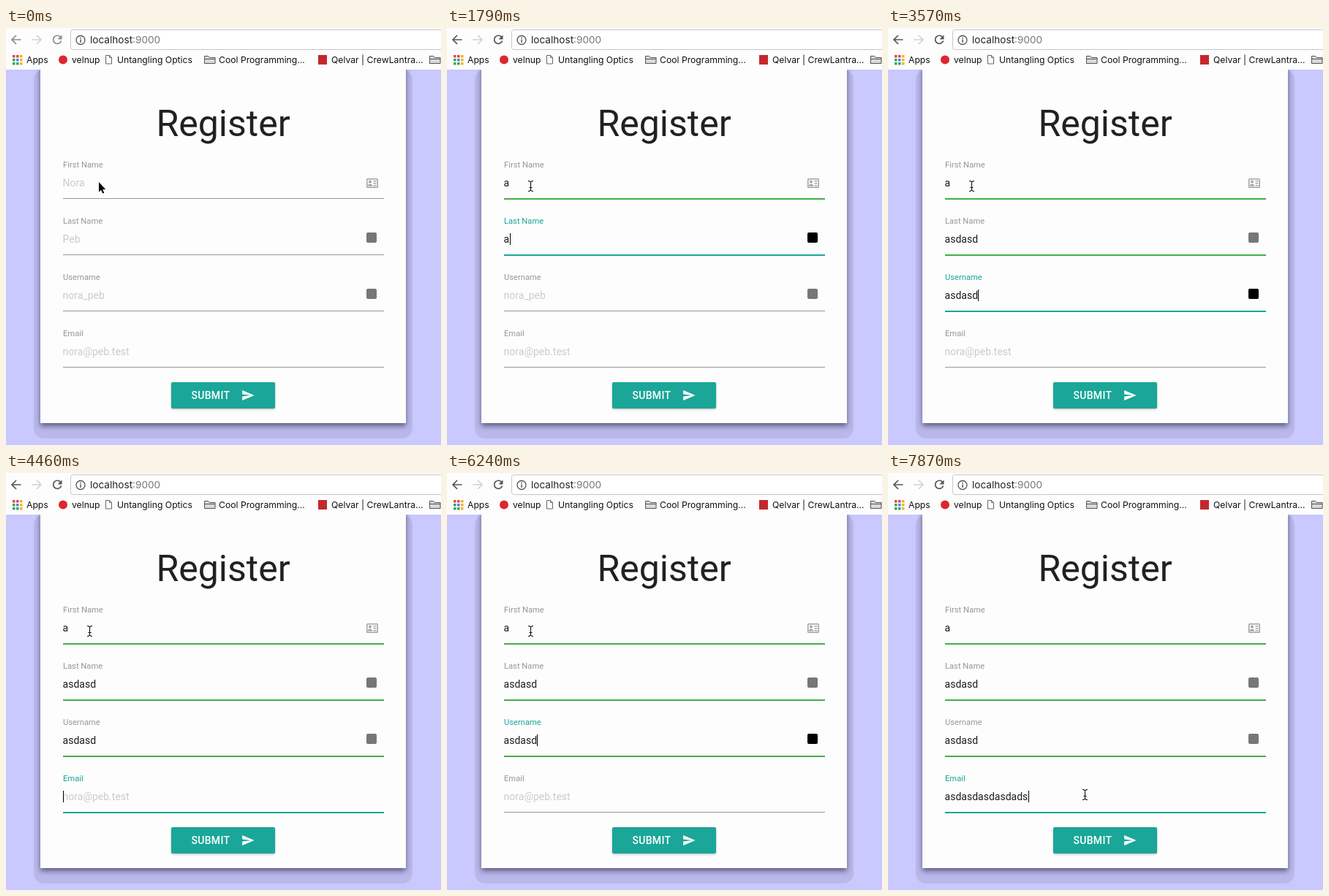
An HTML page with a canvas for the animation above (8 s loop, 595 by 571 pixels).

```html
<!DOCTYPE html>
<html lang="en">
<head>
<meta charset="utf-8">
<title>Register form</title>
<style>
  html, body { margin: 0; width: 100%; height: 100%; overflow: hidden; background: #c9c8ff; }
  canvas { display: block; width: 595px; height: 571px; }
</style>
</head>
<body>
<canvas id="stage" width="595" height="571"></canvas>
<script>
const ctx = document.getElementById('stage').getContext('2d');
const LOOP = 8000;
const STEP = 148.3;
const TEAL = '#1aa698';
const GREEN = '#43ad48';
const GREY = '#979797';
const UI = 'Inter, sans-serif';
const BODY = 'Roboto, sans-serif';

// Key lists hold [step, value]; a value lasts until the next key.
const focusKeys = [[0, -1], [8, 0], [11, 1], [20, 2], [28, 3], [34, 2], [44, 3]];
const fields = [
  { label: 'First Name', hint: 'Nora', text: 'a', icon: 'card', validFrom: 11,
    typed: [[0, 0], [9, 1]] },
  { label: 'Last Name', hint: 'Peb', text: 'asdasd', icon: 'square', validFrom: 20,
    typed: [[0, 0], [12, 1], [13, 2], [14, 3], [15, 5], [16, 6]] },
  { label: 'Username', hint: 'nora_peb', text: 'asdasd', icon: 'square', validFrom: 28,
    selected: [34, 37],
    typed: [[0, 0], [21, 1], [22, 3], [23, 4], [24, 6], [37, 0], [40, 2], [41, 4], [42, 6]] },
  { label: 'Email', hint: 'nora@peb.test', text: 'asdasdasdasdads', validFrom: Infinity,
    typed: [[0, 0], [46, 1], [47, 2], [48, 5], [49, 7], [50, 10], [51, 12], [52, 14], [53, 15]] }
];
const mouseKeys = [[0, 127, 211], [4, 114, 216], [50, 114, 216],
  [51, 190, 320], [52, 245, 410], [53, 269, 440]];

function valueAt(keys, step) {
  return keys.filter(key => key[0] <= step).pop()[1];
}

function mouseAt(step) {
  const next = mouseKeys.findIndex(key => key[0] > step);
  if (next < 0) return mouseKeys[mouseKeys.length - 1].slice(1);
  const [s0, x0, y0] = mouseKeys[next - 1];
  const [s1, x1, y1] = mouseKeys[next];
  const k = (step - s0) / (s1 - s0);
  return [Math.round(x0 + (x1 - x0) * k), Math.round(y0 + (y1 - y0) * k)];
}

function rect(x, y, w, h, color, radius = 0) {
  ctx.fillStyle = color;
  ctx.beginPath();
  ctx.roundRect(x, y, w, h, radius);
  ctx.fill();
}

function circle(x, y, r, color) {
  ctx.fillStyle = color;
  ctx.beginPath();
  ctx.arc(x, y, r, 0, Math.PI * 2);
  ctx.fill();
}

function text(str, x, y, size, color, family = BODY, weight = 400) {
  ctx.font = `${weight} ${size}px ${family}`;
  ctx.fillStyle = color;
  ctx.fillText(str, x, y);
  return ctx.measureText(str).width;
}

function stroke(path, color, width = 1) {
  ctx.strokeStyle = color;
  ctx.lineWidth = width;
  ctx.stroke(new Path2D(path));
}

function fill(path, color) {
  ctx.fillStyle = color;
  ctx.fill(new Path2D(path));
}

function withShadow(color, blur, dy, draw) {
  ctx.save();
  ctx.shadowColor = color;
  ctx.shadowBlur = blur;
  ctx.shadowOffsetY = dy;
  draw();
  ctx.restore();
}

function drawFolder(x) {
  fill(`M${x} 38h6l1.5 2h8v9h-15.500z`, '#d9d9d9');
  stroke(`M${x + .5} 48.500v-10h5l2 2h7.500v8zM${x + .5} 42.500h14.500`, '#555');
}

function drawBrowser(active) {
  rect(0, 0, 595, 57, '#fdfdfd');
  const tool = active ? '#555' : '#8c8c8c';
  stroke('M20.500 16H8.500M14 10L8 16L14 22', tool, 1.7);
  stroke('M35 16H48M42 10L48 16L42 22', '#d2d2d2', 1.7);
  stroke('M74.500 12.200A5.600 5.600 0 1 0 75.600 17.500', tool, 1.7);
  fill('M76.500 9.500v6h-6z', tool);

  ctx.beginPath();
  ctx.roundRect(88.5, 2.5, 520, 27, 3);
  ctx.fillStyle = '#fff';
  ctx.fill();
  ctx.strokeStyle = '#c6c6c6';
  ctx.lineWidth = 1;
  ctx.stroke();
  stroke('M96 16.500a6 6 0 1 0 12 0a6 6 0 1 0 -12 0', '#555', 1.3);
  rect(101.3, 15.5, 1.5, 4.5, '#555');
  rect(101.3, 12.8, 1.5, 1.6, '#555');
  const hostWidth = text('localhost', 115, 21, 13.6, '#222', UI);
  text(':9000', 115 + hostWidth, 21, 13.6, '#777', UI);

  const dots = ['#e8453c', '#e8453c', '#f5b32c', '#35a655', '#4285f4', '#f5b32c',
    '#35a655', '#35a655', '#f5b32c'];
  dots.forEach((color, i) => rect(9 + i % 3 * 5, 37 + Math.floor(i / 3) * 5, 3.5, 3.5, color));
  circle(78, 43.5, 6, '#e0262d');
  stroke('M136.500 37.500h5l3 3v8.500h-8zM141.500 37.500v3h3', '#666');
  drawFolder(271);
  rect(427, 37, 12, 13, '#c4282d');
  drawFolder(579);
  const links = [['Apps', 28], ['velnup', 90], ['Untangling Optics', 152],
    ['Cool Programming...', 291], ['Qelvar | CrewLantra...', 445]];
  links.forEach(([name, x]) => text(name, x, 48, 12.2, '#111', UI));
}

function drawCard() {
  rect(0, 57, 595, 514, '#c9c8ff');
  rect(38, 57, 518, 505, '#bab8ea', 14);
  withShadow('rgba(20,18,50,.55)', 7, 4, () => rect(47, 50, 500, 491, '#fdfdfd'));
  ctx.textAlign = 'center';
  text('Register', 297, 148, 50, '#212121');
  ctx.textAlign = 'left';
}

function drawButton() {
  withShadow('rgba(0,0,0,.3)', 3, 1, () => rect(226, 485, 142, 36, TEAL, 2));
  ctx.letterSpacing = '0.3px';
  text('SUBMIT', 253.5, 508, 14, '#fff', BODY, 500);
  ctx.letterSpacing = '0px';
  ctx.save();
  ctx.translate(321.6, 493.6);
  ctx.scale(.78, .78);
  fill('M2 21L23 12L2 3V10L17 12L2 14Z', '#fff');
  ctx.restore();
}

function drawContactIcon(top, color) {
  rect(493, top, 16, 13, color, 1.5);
  rect(494.5, top + 1.5, 13, 10, '#fdfdfd');
  circle(498, top + 4.5, 1.9, color);
  fill(`M495 ${top + 10.5}v-1.500q3 -3 6 0v1.500z`, color);
  [3, 6, 9].forEach(dy => rect(502.5, top + dy, 4, 1.4, color));
}

function drawAccents(field, index, step) {
  const y = index * 77;
  const focused = valueAt(focusKeys, step) === index;
  const valid = step >= field.validFrom;
  text(field.label, 78, y + 190.5, 11.2, focused ? TEAL : GREY);
  rect(78, y + 233, 439, valid || focused ? 2 : 1, valid ? GREEN : focused ? TEAL : GREY);
}

function drawField(field, index, step) {
  const y = index * 77;
  const base = y + 217;
  const focus = valueAt(focusKeys, step);
  const focused = focus === index;
  const value = field.text.slice(0, valueAt(field.typed, step));
  const selected = field.selected && step >= field.selected[0] && step < field.selected[1];

  // A focus change fades the label and underline over one step.
  if (step > 0 && valueAt(focusKeys, step - 1) !== focus) {
    drawAccents(field, index, step - 1);
    ctx.globalAlpha = .6;
  }
  drawAccents(field, index, step);
  ctx.globalAlpha = 1;

  ctx.font = `400 14px ${BODY}`;
  const width = ctx.measureText(value).width;
  if (selected) rect(78, base - 13, width, 16, '#b3d4fc');
  text(value || field.hint, 77.6, base, 14, value ? '#1c1c1c' : '#cbcbcb');
  if (focused && !selected) rect(78 + Math.round(width), base - 13, 1, 16, '#000');

  if (field.icon === 'card') drawContactIcon(y + 206, focused ? '#000' : '#a2a2a2');
  if (field.icon === 'square') rect(493, y + 203, 14, 14, focused ? '#000' : '#777', 2);
}

function drawMouse(step) {
  const [x, y] = mouseAt(step);
  ctx.save();
  ctx.translate(x, y);
  if (step < 4) {
    const arrow = 'M0 0V13.500L3 10.700L5.200 15.600L7.300 14.700L5.200 9.900H9.300Z';
    stroke(arrow, '#fff', 2);
    fill(arrow, '#000');
  } else {
    const beam = 'M-3 -6.500H-1.500L.5 -5L2.500 -6.500H4M.5 -5V6M-3 7.500H-1.500L.5 6L2.500 7.500H4M-1.500 2.500H2.500';
    stroke(beam, 'rgba(255,255,255,.8)', 2.5);
    stroke(beam, '#111', 1.1);
  }
  ctx.restore();
}

function frame(now) {
  const step = Math.floor(now % LOOP / STEP);
  drawCard();
  fields.forEach((field, index) => drawField(field, index, step));
  drawButton();
  drawBrowser(step >= 4);
  drawMouse(step);
  requestAnimationFrame(time => frame(Math.max(0, time - start)));
}

const start = performance.now();
frame(0);
</script>
</body>
</html>
```
